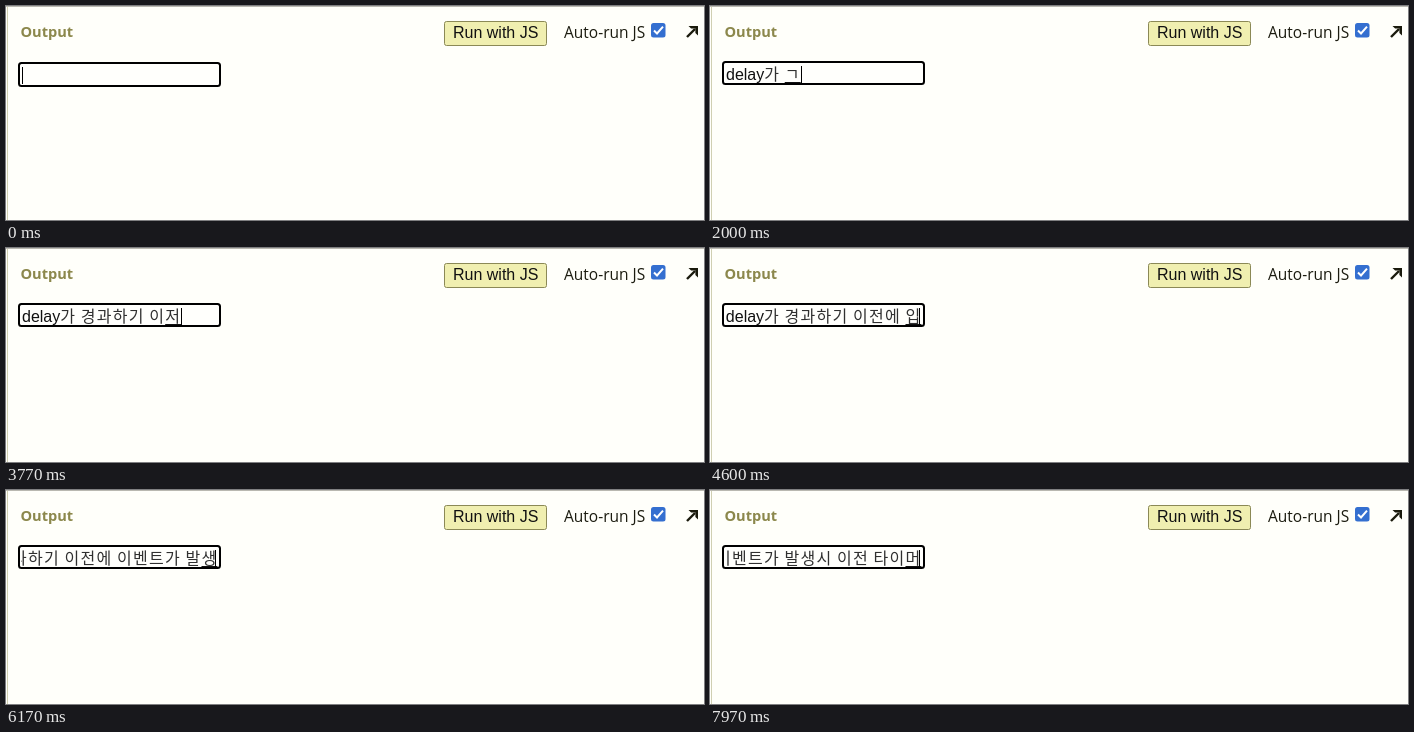
These frames come from a looping animation (698 by 214 pixels, 8000 ms). An HTML page:

```html
<!DOCTYPE html>
<html lang="ko">
<head>
<meta charset="utf-8">
<title>Output</title>
<style>
  html, body { margin: 0; width: 100%; height: 100%; overflow: hidden; background: #fffffa; }
  svg { display: block; }
  text { white-space: pre; }
  .ui { font-family: "Open Sans", "Noto Sans", sans-serif; }
  .arial { font: 16px "Liberation Sans", Arial, sans-serif; }
  .ko {
    font-family: "Noto Sans CJK KR", "Noto Sans CJK", sans-serif;
    font-size: 16px; font-weight: 300; letter-spacing: 0.08em; fill: #303030;
  }
</style>
</head>
<body>
<svg width="698" height="214" viewBox="0 0 698 214">
  <defs><clipPath id="inner"><rect x="15" y="57" width="197" height="23"/></clipPath></defs>
  <rect width="698" height="214" fill="#fffffa"/>
  <rect width="698" height="1" fill="#b9b8b0"/>
  <rect x="1" y="1" width="1" height="213" fill="#d0cfb2"/>

  <text class="ui" x="14.5" y="31" font-size="14.6" font-weight="700" fill="#8c884c">Output</text>
  <rect x="438.5" y="15.5" width="102" height="24" rx="2" fill="#f0efb0" stroke="#8b8956"/>
  <text class="arial" x="447" y="32" fill="#111">Run with JS</text>
  <text class="ui" x="558" y="32" font-size="15.5" fill="#1c1c10">Auto-run JS</text>
  <rect x="645" y="17" width="14.5" height="14.5" rx="2.5" fill="#346fd0"/>
  <path d="M648 24.5l3 3 6-6.8" fill="none" stroke="#fff" stroke-width="2"/>
  <path d="M681 31l8-8" fill="none" stroke="#1a1a0c" stroke-width="2.4"/>
  <path d="M682.5 20h9.5v9.5l-2.6-2.6v-4.3h-4.3z" fill="#1a1a0c"/>

  <rect id="box" x="13" width="201" rx="2.5" fill="#fffffc" stroke="#000" stroke-width="2"/>
  <g clip-path="url(#inner)">
    <text id="value" class="arial" fill="#111"></text>
    <rect id="underline" height="1" fill="#111"/>
    <rect id="caret" width="1" height="17" fill="#000"/>
  </g>
</svg>
<script>
const LOOP = 8000, LEFT = 16, RIGHT = 211.5, CARET_MAX = 209;
const PHRASE = 'delay가 경과하기 이전에 이벤트가 발생시 이전 타이머';
const LEADS = 'ㄱㄲㄴㄷㄸㄹㅁㅂㅃㅅㅆㅇㅈㅉㅊㅋㅌㅍㅎ';
const FINALS = ' ㄱㄲㄳㄴㄵㄶㄷㄹㄺㄻㄼㄽㄾㄿㅀㅁㅂㅄㅅㅆㅇㅈㅊㅋㅌㅍㅎ';
const PAIRS = { 'ㄹㅅ': 'ㄽ' };
const BASE = 0xAC00, WA = 9, O = 8;

// [keystrokes so far, ms]
const PACE = [[0, 50], [5, 900], [6, 1300], [9, 1930], [23, 3720],
  [37, 5320], [43, 6110], [52, 7070], [58, 7900]];

const $ = id => document.getElementById(id);
const set = (el, attrs) => { for (const k in attrs) el.setAttribute(k, attrs[k]); };
const isSyllable = ch => ch >= '가' && ch <= '힣';
const syllable = (l, v, t) => String.fromCharCode(BASE + (l * 21 + v) * 28 + t);
const split = ch => {
  const n = ch.charCodeAt(0) - BASE;
  return [Math.floor(n / 588), Math.floor(n / 28) % 21, n % 28];
};

// A leading consonant first lands under the previous syllable when it can.
function addLead(done, lead) {
  const prev = done.slice(-1);
  if (isSyllable(prev)) {
    const [l, v, t] = split(prev);
    const final = FINALS.indexOf(t ? PAIRS[FINALS[t] + lead] : lead);
    if (final > 0) return done.slice(0, -1) + syllable(l, v, final);
  }
  return done + lead;
}

function keystrokes(phrase) {
  const states = [{ text: '', composing: false }];
  const push = (text, composing) => states.push({ text, composing });
  let done = '';
  for (const ch of phrase) {
    if (isSyllable(ch)) {
      const [l, v, t] = split(ch);
      push(addLead(done, LEADS[l]), true);
      if (v === WA) push(done + syllable(l, O, 0), true);
      push(done + syllable(l, v, 0), true);
      if (t) push(done + ch, true);
    } else {
      push(done + ch, false);
    }
    done += ch;
  }
  return states;
}

const states = keystrokes(PHRASE);

function strokesAt(ms) {
  if (ms < PACE[0][1]) return 0;
  for (let i = 1; i < PACE.length; i++) {
    const [n0, t0] = PACE[i - 1], [n1, t1] = PACE[i];
    if (ms < t1) return Math.floor(n0 + (n1 - n0) * (ms - t0) / (t1 - t0));
  }
  return states.length - 1;
}

let shown = -1;
function render(ms) {
  const index = Math.min(strokesAt(ms), states.length - 1);
  if (index === shown) return;
  shown = index;
  const { text, composing } = states[index];
  const hangul = /[ㄱ-힣]/.test(text);
  const top = hangul ? 56 : 57;
  const value = $('value');

  value.innerHTML = text.replace(/[ㄱ-힣]+/g, '<tspan class="ko">$&</tspan>');
  const width = text ? value.getComputedTextLength() : 0;
  const x = Math.min(LEFT, RIGHT - width);
  const last = composing ? value.getSubStringLength(text.length - 1, 1) : 0;

  set($('box'), { y: top, height: hangul ? 22 : 23 });
  set(value, { x, y: top + 18 });
  set($('underline'), { x: x + width - last, y: top + 20, width: last });
  set($('caret'), { x: Math.min(CARET_MAX, Math.round(x + width)), y: top + 4 });
}

const start = performance.now();
function tick() {
  render((performance.now() - start) % LOOP);
  requestAnimationFrame(tick);
}
tick();
</script>
</body>
</html>
```
